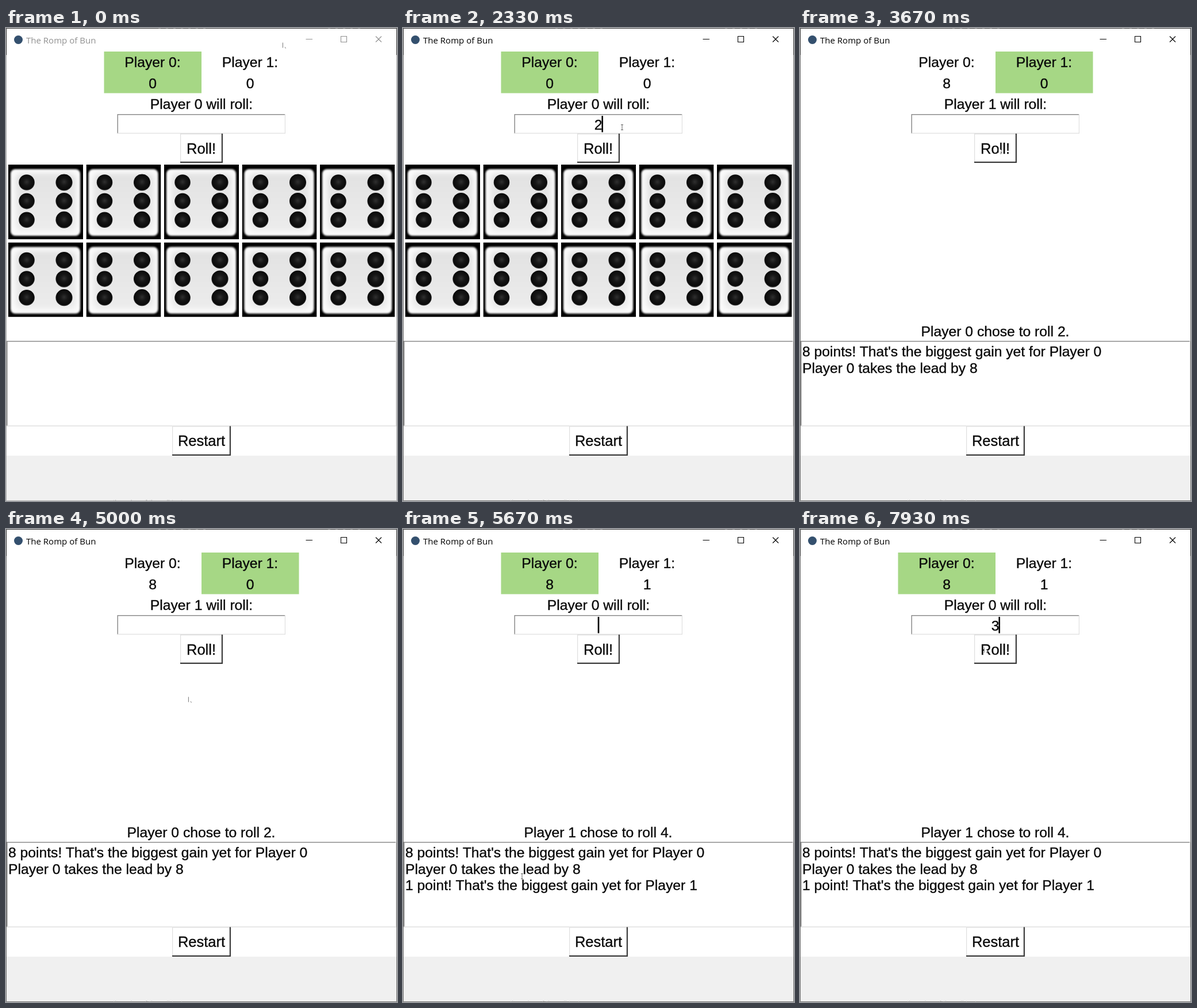
An HTML page for the animation above (8000 ms loop, 680 by 824 pixels).

```html
<!DOCTYPE html>
<html lang="en">
<head>
<meta charset="utf-8">
<title>Dice game</title>
<style>
  html, body { margin: 0; width: 100%; height: 100%; overflow: hidden; background: #fff; }
  svg { display: block; width: 680px; height: 824px; }
  text { font: 24.7px "Liberation Sans", Arial, sans-serif; fill: #0a0a0a; stroke: #0a0a0a; stroke-width: .35px; }
  .mid { text-anchor: middle; }
  .button { font-size: 25.5px; }
  .title { font: 15px "Open Sans", "Noto Sans", sans-serif; stroke: none; }
  .crumbs { font-size: 12px; fill: #aaa; stroke: none; }
</style>
</head>
<body>
<svg id="stage" viewBox="0 0 680 824" xmlns="http://www.w3.org/2000/svg">
  <defs>
    <filter id="soft" x="-20%" y="-20%" width="140%" height="140%"><feGaussianBlur stdDeviation="1.6"/></filter>
    <filter id="softer" x="-20%" y="-20%" width="140%" height="140%"><feGaussianBlur stdDeviation="4"/></filter>
    <radialGradient id="ball" cx=".5" cy=".47" r=".53">
      <stop offset="0" stop-color="#303030"/>
      <stop offset=".4" stop-color="#171717"/>
      <stop offset=".85" stop-color="#0a0a0a"/>
      <stop offset="1" stop-color="#333"/>
    </radialGradient>
    <linearGradient id="face" x2="0" y2="1">
      <stop offset="0" stop-color="#e2e2e2"/>
      <stop offset="1" stop-color="#ececec"/>
    </linearGradient>
    <clipPath id="square"><rect width="130" height="130"/></clipPath>
    <g id="die" clip-path="url(#square)">
      <rect width="130" height="130"/>
      <rect x="4" y="8" width="121" height="116" rx="8" fill="#fbfbfb" filter="url(#soft)"/>
      <rect x="12" y="15" width="106" height="101" rx="10" fill="url(#face)" filter="url(#softer)"/>
    </g>
  </defs>

  <rect width="680" height="824" fill="#fff"/>
  <rect y="745" width="680" height="79" fill="#f0f0f0"/>
  <circle cx="21.5" cy="20.5" r="7.5" fill="#34506e"/>
  <g id="chrome">
    <text class="title" x="35" y="27" style="fill:currentColor">The Romp of Bun</text>
    <path d="M521.5 19.5h11.5M582.5 14.5h10v10h-10zM643 14.5l10 10M653 14.5l-10 10" fill="none" stroke="currentColor" stroke-width="1.1"/>
  </g>

  <rect id="turn" y="41" width="169.5" height="72.5" fill="#a6d785"/>
  <text class="mid" x="255" y="68">Player 0:</text>
  <text class="mid" x="424.5" y="68">Player 1:</text>
  <text class="mid" x="255" y="104.7" id="score0"></text>
  <text class="mid" x="424.5" y="104.7" id="score1"></text>
  <text class="mid" x="340" y="141" id="prompt"></text>

  <g id="panels"></g>
  <text class="mid" x="339.5" y="176.5" id="entry"></text>
  <rect id="caret" y="153" width="2.6" height="28.5"/>
  <g id="rollUp"></g>
  <g id="rollDown"></g>
  <g id="dice"></g>
  <text class="mid" x="339.5" y="536.5" id="chose"></text>
  <g id="log"></g>

  <path id="frame" d="M.5 47V823.5H679.5V47" fill="none"/>
  <path d="M.5 47V.5H679.5V47" fill="none" stroke="#2e2e2e"/>
  <path d="M265 .5h90M560 .5h62" stroke="#555" stroke-dasharray="4 9"/>
  <text class="crumbs" x="186" y="831">the rules of the roll text</text>

  <g id="arrow">
    <path d="M0 0V10L2.3 8L4 11.3L5.6 10.5L4.2 7.3H7Z" fill="#fff"/>
    <path d="M.4 .5V9.5M4.2 8.2l1.2 2.4" fill="none" stroke="#666" stroke-width=".9"/>
  </g>
  <path id="beam" d="M-2-4.5H2M0-4.5V4.5M-2 4.5H2" fill="none" stroke="#555" stroke-width=".9"/>
</svg>

<script>
const LOOP = 8000, STEP = 1000 / 15;
const NS = "http://www.w3.org/2000/svg";
const $ = id => document.getElementById(id);

function add(parent, tag, attrs, text) {
  const el = document.createElementNS(NS, tag);
  for (const key in attrs) el.setAttribute(key, attrs[key]);
  if (text) el.textContent = text;
  parent.append(el);
  return el;
}

function bevel(parent, [x, y, w, h], fill, light, dark, lightWidth, darkWidth) {
  add(parent, "rect", { x, y, width: w, height: h, fill });
  const edge = (d, stroke, width) =>
    add(parent, "path", { d, stroke, "stroke-width": width, fill: "none" });
  const a = lightWidth / 2, b = darkWidth / 2;
  edge(`M${x + a} ${y + h}V${y + a}H${x + w}`, light, lightWidth);
  edge(`M${x} ${y + h - b}H${x + w - b}V${y}`, dark, darkWidth);
}

function button(parent, box, label, x, y, pressed) {
  if (pressed) bevel(parent, box, "#a6d785", "#22301a", "#cfe8bd", 2.2, 1.4);
  else bevel(parent, box, "#fff", "#dedede", "#3c3c3c", 1.2, 2.2);
  add(parent, "text", { class: "mid button", x, y }, label);
}

const rollBox = [303, 184, 74, 51];
bevel($("panels"), [193.5, 150, 292.5, 34], "#fff", "#8c8c8c", "#e0e0e0", 1.5, 1.2);
bevel($("panels"), [1, 545, 678, 149], "#fff", "#8c8c8c", "#e0e0e0", 1.6, 1.4);
button($("panels"), [289, 693.5, 102, 51.5], "Restart", 340, 728.3);
button($("rollUp"), rollBox, "Roll!", 339.5, 218.5);
button($("rollDown"), rollBox, "Roll!", 341, 220, true);

for (const cx of [32, 97])
  for (let row = 0; row < 3; row++)
    add($("die"), "circle", {
      cx, cy: 31 + row * 32.6, r: cx > 50 ? 14.6 : 13.8, fill: "url(#ball)"
    });
for (let i = 0; i < 10; i++)
  add($("dice"), "use", {
    href: "#die", x: 4 + (i % 5) * 135.5, y: 238 + (i > 4 ? 135.5 : 0)
  });

const logLines = [
  "8 points! That's the biggest gain yet for Player 0",
  "Player 0 takes the lead by 8",
  "1 point! That's the biggest gain yet for Player 1"
].map((line, i) => add($("log"), "text", { x: 4, y: 571.8 + i * 28.7 }, line));

// Each state holds from its start time.
const states = [
  { at: 0, player: 0, scores: [0, 0], chose: "", lines: 0 },
  { at: 3670, player: 1, scores: [8, 0], chose: "Player 0 chose to roll 2.", lines: 2 },
  { at: 5670, player: 0, scores: [8, 1], chose: "Player 1 chose to roll 4.", lines: 3 }
];
const caretOn = [[1130, 1730], [2000, 2600], [2870, 3470], [5670, 6270], [6570, 7170], [7470, LOOP]];

// time, x, y of the pointer
const pointer = [
  [0, 481, 25], [267, 481, 25], [867, 381, 173], [2800, 381, 173], [3200, 345, 208],
  [4990, 345, 208], [5000, 317, 292], [5667, 207, 605], [5800, 207, 581],
  [6133, 211.5, 596], [6400, 211.5, 596], [7267, 317, 196], [7333, 316, 188],
  [7600, 316, 188], [7933, 320, 206], [LOOP, 320, 206]
];

function pointerAt(time) {
  const t = Math.floor((time + 5) / STEP) * STEP;
  const i = Math.max(1, pointer.findIndex(p => p[0] > t));
  const [t0, x0, y0] = pointer[i - 1], [t1, x1, y1] = pointer[i];
  const u = (t - t0) / (t1 - t0), k = u * u * (3 - 2 * u);
  return [x0 + (x1 - x0) * k, y0 + (y1 - y0) * k];
}

const within = (t, from, to) => t >= from && t < to;
const show = (el, on) => el.setAttribute("visibility", on ? "visible" : "hidden");

function setText(id, text) {
  if ($(id).textContent !== text) $(id).textContent = text;
}

function draw(t) {
  const state = states.findLast(s => t >= s.at);
  const active = t >= 1130;
  const digit = within(t, 2330, 3670) ? "2" : t >= 7330 ? "3" : "";
  const pressed = within(t, 3530, 3670);

  $("chrome").style.color = active ? "#000" : "#919191";
  $("frame").setAttribute("stroke", active ? "#6c6c6c" : "#aaa");
  $("turn").setAttribute("x", state.player ? 340 : 170.5);
  state.scores.forEach((n, i) => setText("score" + i, String(n)));
  setText("prompt", `Player ${state.player} will roll:`);
  setText("chose", state.chose);
  setText("entry", digit);
  logLines.forEach((el, i) => show(el, i < state.lines));
  show($("dice"), state.lines === 0);
  show($("rollUp"), !pressed);
  show($("rollDown"), pressed);

  $("caret").setAttribute("x", digit ? 345.4 : 338.7);
  show($("caret"), caretOn.some(([a, b]) => within(t, a, b)));

  const [x, y] = pointerAt(t);
  const overText = within(x, 194, 486) && within(y, 150, 184) || within(y, 545, 694);
  show($("beam"), overText);
  show($("arrow"), !overText);
  $(overText ? "beam" : "arrow").setAttribute("transform", `translate(${x} ${y})`);
}

const start = performance.now();
function tick() {
  draw((performance.now() - start) % LOOP);
  requestAnimationFrame(tick);
}
tick();
</script>
</body>
</html>
```
